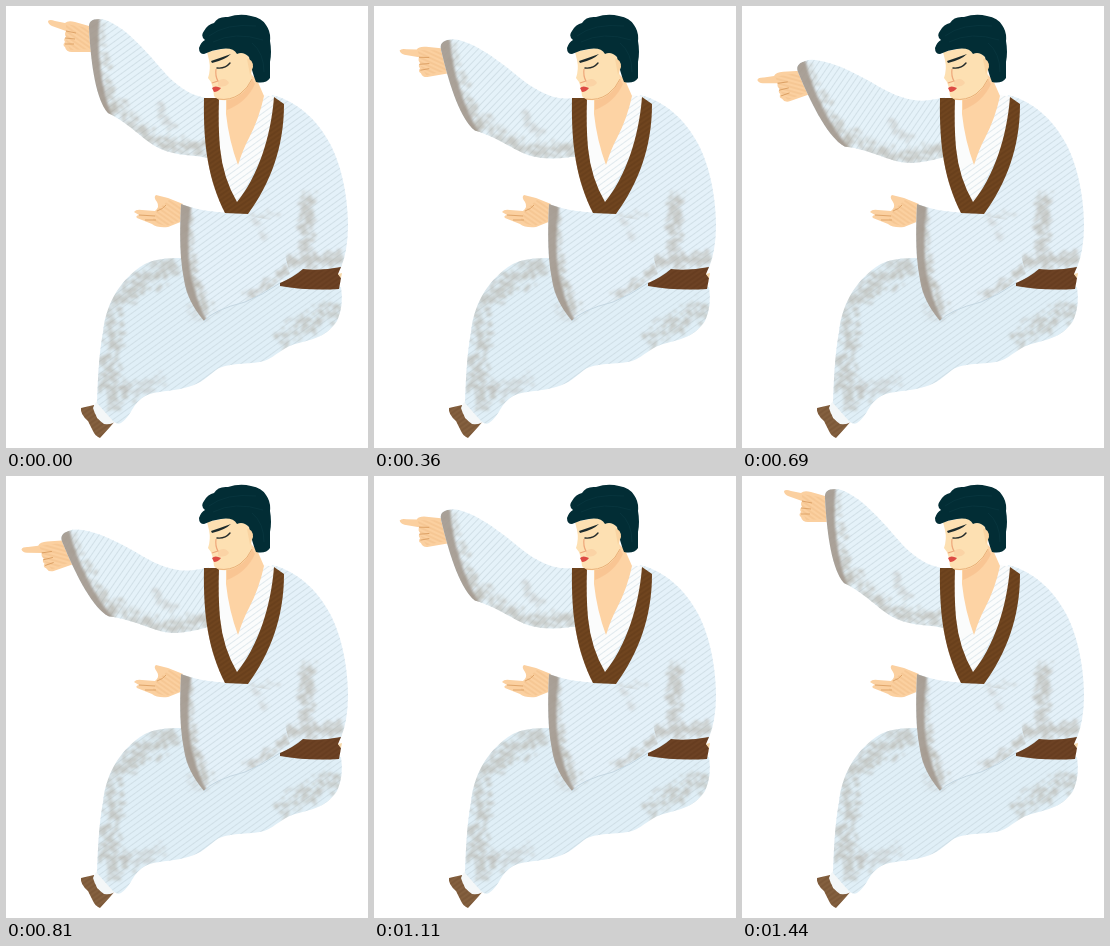
These frames come from a looping animation (362x442 px, 1.47 s). An HTML page:

```html
<!DOCTYPE html>
<html lang="en">
<head>
<meta charset="utf-8">
<title>Pointing figure</title>
<style>
html, body { margin: 0; width: 100%; height: 100%; overflow: hidden; background: #fff; }
svg { display: block; width: 100vw; height: 100vh; }
</style>
</head>
<body>
<svg viewBox="0 0 362 442" xmlns="http://www.w3.org/2000/svg">
  <defs>
    <pattern id="hatch" width="6" height="5" patternUnits="userSpaceOnUse" patternTransform="rotate(-36)">
      <path d="M0 2.5H6" stroke="#cbdae2" stroke-width=".8"/>
    </pattern>
    <pattern id="grain" width="5" height="4" patternUnits="userSpaceOnUse" patternTransform="rotate(-35)">
      <path d="M0 2H5" stroke="#4d2a12" stroke-width=".8"/>
    </pattern>
    <pattern id="skinGrain" width="5" height="4" patternUnits="userSpaceOnUse" patternTransform="rotate(35)">
      <path d="M0 2H5" stroke="#e2a566" stroke-width=".7"/>
    </pattern>
    <filter id="soft" x="-20%" y="-20%" width="140%" height="140%"><feGaussianBlur stdDeviation="1.5"/></filter>
    <filter id="edge" x="-30%" y="-10%" width="160%" height="120%"><feGaussianBlur stdDeviation=".8"/></filter>
    <path id="armShape" d="M83 22Q82 13 93 13Q99 13 106 17C121 25 133 38 145 51C158 66 166 77 184 87Q194 92 213 94L209 153C200 153 196 150 189 150C176 149 164 147 155 143C140 137 126 119 102 107C90 93 85 60 83 22Z"/>
    <path id="torsoShape" d="M266 89C291 95 311 114 323 136C335 157 342 190 342 219Q342 246 334 264L280 276L205 230L221 206Z"/>
    <path id="skirtShape" d="M276 276L335 281Q338 300 331 315C321 330 308 333 293 337C277 340 270 351 258 355C242 359 222 356 210 364C198 374 192 379 178 382C164 386 152 384 139 390C127 396 125 411 115 417Q111 419 107 415L91 397C92 370 93 348 97 326C100 299 112 277 134 261C147 252 162 252 178 252Z"/>
    <path id="sleeveShape" d="M175 198C190 204 207 206 224 207L270 215L284 268C270 279 256 289 239 296C221 301 209 304 198 315C187 302 180 288 178 274C173 250 174 222 175 198Z"/>
    <path id="beltShape" d="M274 277Q288 271 297 263Q315 265 335 261L332 268L335 272L333 283Q302 285 274 280Z"/>
    <path id="collarShape" d="M198 92H213Q212 120 214 142Q217 172 231 196C251 172 265 132 268 91L278 98C278 142 264 178 242 208L219 207C203 175 197 142 198 92Z"/>
    <path id="shoeShape" d="M75 402L88 399L91 412L98 417L110 414L104 421L94 432Q89 430 87 425L82 415Q74 408 75 402Z"/>
    <clipPath id="armClip"><use href="#armShape"/></clipPath>
    <clipPath id="torsoClip"><use href="#torsoShape"/></clipPath>
    <clipPath id="skirtClip"><use href="#skirtShape"/></clipPath>
    <clipPath id="sleeveClip"><use href="#sleeveShape"/></clipPath>
  </defs>
  <rect width="362" height="442" fill="#fff"/>

  <g id="arm">
    <path fill="#fbd0a0" d="M42 15Q44 13 49 15L59 17Q62 14 69 16L90 22L91 46L66 46Q60 46 59 41Q56 39 59 36Q57 33 60 31Q58 28 60 25L46 20Q42 18 42 15Z"/>
    <path fill="url(#skinGrain)" opacity=".6" d="M60 18L88 23V43L64 44L60 34Z"/>
    <path fill="none" stroke="#dca064" stroke-width=".9" d="M60 25L70 27M59 32L69 33M59 38L68 38"/>
    <use href="#armShape" fill="#e5f2f9"/>
    <use href="#armShape" fill="url(#hatch)"/>
    <g clip-path="url(#armClip)">
      <g id="armSmudge" filter="url(#soft)"></g>
      <path filter="url(#edge)" fill="#a3988d" opacity=".9" d="M80 10L94 12C91 36 93 76 106 110L100 112C86 90 82 50 80 10Z"/>
    </g>
  </g>

  <use href="#shoeShape" fill="#84603f"/>
  <use href="#shoeShape" fill="url(#grain)" opacity=".35"/>
  <path fill="#f4f7f8" d="M91 395L97 397L112 414Q107 419 98 418Q90 413 87 402Q88 398 91 395Z"/>

  <use href="#skirtShape" fill="#e0eff7"/>
  <use href="#skirtShape" fill="url(#hatch)"/>
  <g clip-path="url(#skirtClip)"><g id="skirtSmudge" filter="url(#soft)"></g></g>

  <use href="#torsoShape" fill="#e4f1f9"/>
  <use href="#torsoShape" fill="url(#hatch)"/>
  <g clip-path="url(#torsoClip)"><g id="torsoSmudge" filter="url(#soft)"></g></g>

  <path fill="#fbd0a0" d="M128 206Q130 203 136 204L149 205Q154 201 151 196Q147 191 150 189L162 192L177 198V215L162 221Q151 222 146 218L131 212Q129 210 133 209Z"/>
  <path fill="url(#skinGrain)" opacity=".6" d="M151 204L163 194L176 199V214L160 220L146 216Z"/>
  <path fill="none" stroke="#dca064" stroke-width=".9" d="M133 209L149 210M139 214L150 214M151 205Q157 203 160 199"/>

  <use href="#sleeveShape" fill="#e4f1f9"/>
  <use href="#sleeveShape" fill="url(#hatch)"/>
  <g clip-path="url(#sleeveClip)">
    <g id="sleeveSmudge" filter="url(#soft)"></g>
    <path filter="url(#edge)" fill="#a3988d" opacity=".9" d="M172 194L185 200C181 232 182 262 188 282Q193 300 201 314L196 318C177 294 170 260 172 194Z"/>
  </g>
  <path fill="none" stroke="#c3d5e0" stroke-width="1" d="M198 315Q207 304 239 296Q257 289 274 277"/>

  <use href="#beltShape" fill="#6d4224"/>
  <use href="#beltShape" fill="url(#grain)" opacity=".5"/>
  <path fill="#f6d7a8" d="M332 268L336 267L335 272Z"/>

  <path fill="#fbfcfc" d="M208 91L222 91L258 89L270 91L266 130L231 199L212 165Z"/>
  <path fill="url(#hatch)" opacity=".7" d="M258 89L270 91L266 130L231 199L214 165L232 156Z"/>
  <path fill="#fdd3a4" d="M220 85L245 68L251 74L258 90Q253 113 243 132Q237 143 232 159Q223 135 220 108Z"/>
  <path fill="#f6bd88" opacity=".6" d="M221 93Q238 89 246 73L249 78Q241 96 221 104Z"/>
  <use href="#collarShape" fill="#70451f"/>
  <use href="#collarShape" fill="url(#grain)" opacity=".5"/>

  <path fill="#fde0b2" d="M201 46L231 40L244 52L246 74Q237 91 222 94Q211 95 208 90L207 82L205 76L202 72Q205 63 203 54Z"/>
  <path fill="none" stroke="#eab078" stroke-width="1" d="M212 93Q224 95 234 88Q242 82 246 73"/>
  <path fill="none" stroke="#eea77a" stroke-width="1.2" d="M210 63Q209 70 212 75L206 77"/>
  <path fill="#f7b98d" opacity=".35" d="M212 75Q219 70 223 77Q219 82 212 80Z"/>
  <path fill="#022d35" d="M193 42Q195 36 199 34Q194 30 198 25Q202 18 208 17Q212 10 222 11Q234 7 245 10Q256 12 260 19Q265 26 264 35Q266 46 264 56L264 72Q260 78 250 76Q246 66 243 51Q237 45 231 48Q227 41 215 43Q206 44 198 48Q193 48 193 42Z"/>
  <path fill="none" stroke="#174650" stroke-width=".6" opacity=".5" d="M203 30Q220 17 250 20M207 36Q229 25 257 34M246 37Q258 47 258 66"/>
  <path fill="#fad4a2" d="M241 53Q247 53 247 61L244 69Z"/>
  <path fill="#1b2a2c" d="M205 55Q214 52 225 48Q219 54 206 57Z"/>
  <path fill="none" stroke="#242b2b" stroke-width="1.4" stroke-linecap="round" d="M211 62Q219 63 224 57"/>
  <path fill="#dd4a43" d="M206 82Q209 79 215 82Q212 86 208 86Z"/>
</svg>
<script>
const NS = 'http://www.w3.org/2000/svg';
let seed = 7;
const rnd = () => (seed = seed * 16807 % 2147483647) / 2147483647;
const spread = () => rnd() + rnd() - 1;

// Chalky patch of small dabs scattered along a line.
function smudge(id, x1, y1, x2, y2, width, count, alpha = 0.5) {
  const len = Math.hypot(x2 - x1, y2 - y1);
  const nx = (y1 - y2) / len, ny = (x2 - x1) / len;
  let d = '';
  for (let i = 0; i < count; i++) {
    const t = rnd(), off = spread() * width, r = 0.8 + rnd() * 2.4;
    const x = x1 + (x2 - x1) * t + nx * off, y = y1 + (y2 - y1) * t + ny * off;
    d += `M${(x - r).toFixed(1)} ${y.toFixed(1)}l${r.toFixed(1)} ${(-r * 0.8).toFixed(1)} ${r.toFixed(1)} ${(r * 0.5).toFixed(1)} ${(-r).toFixed(1)} ${r.toFixed(1)}z`;
  }
  const p = document.createElementNS(NS, 'path');
  p.setAttribute('d', d);
  p.setAttribute('fill', '#aaa194');
  p.setAttribute('opacity', alpha);
  document.getElementById(id).append(p);
}

smudge('armSmudge', 90, 15, 106, 110, 8, 100);
smudge('armSmudge', 106, 100, 150, 138, 13, 130);
smudge('armSmudge', 152, 98, 166, 124, 6, 35, 0.35);
smudge('armSmudge', 150, 138, 203, 143, 11, 110);
smudge('torsoSmudge', 303, 185, 299, 245, 10, 130);
smudge('torsoSmudge', 278, 256, 337, 253, 9, 140);
smudge('torsoSmudge', 272, 206, 247, 215, 6, 30, 0.3);
smudge('skirtSmudge', 104, 296, 170, 256, 16, 210);
smudge('skirtSmudge', 102, 300, 110, 345, 14, 100);
smudge('skirtSmudge', 98, 350, 113, 404, 18, 150);
smudge('skirtSmudge', 115, 385, 160, 374, 10, 60, 0.35);
smudge('skirtSmudge', 270, 335, 333, 300, 15, 140);
smudge('skirtSmudge', 180, 310, 215, 300, 12, 50, 0.25);
smudge('sleeveSmudge', 181, 198, 187, 285, 7, 90);
smudge('sleeveSmudge', 183, 270, 200, 308, 11, 80);
smudge('sleeveSmudge', 245, 210, 262, 236, 5, 30, 0.25);
smudge('sleeveSmudge', 240, 292, 284, 262, 9, 60);

const LOOP = 1470, STEP = 30, LOW = 750, HOME = 1440, SWING = 21.2;
const arm = document.getElementById('arm');

function draw(ms) {
  const t = Math.floor(ms % LOOP / STEP) * STEP;
  const k = t < LOW ? t / LOW : (HOME - t) / (HOME - LOW);
  arm.setAttribute('transform', `rotate(${-SWING * k} 200 122)`);
}

const start = performance.now();
function tick() {
  draw(performance.now() - start);
  requestAnimationFrame(tick);
}
tick();
</script>
</body>
</html>
```
